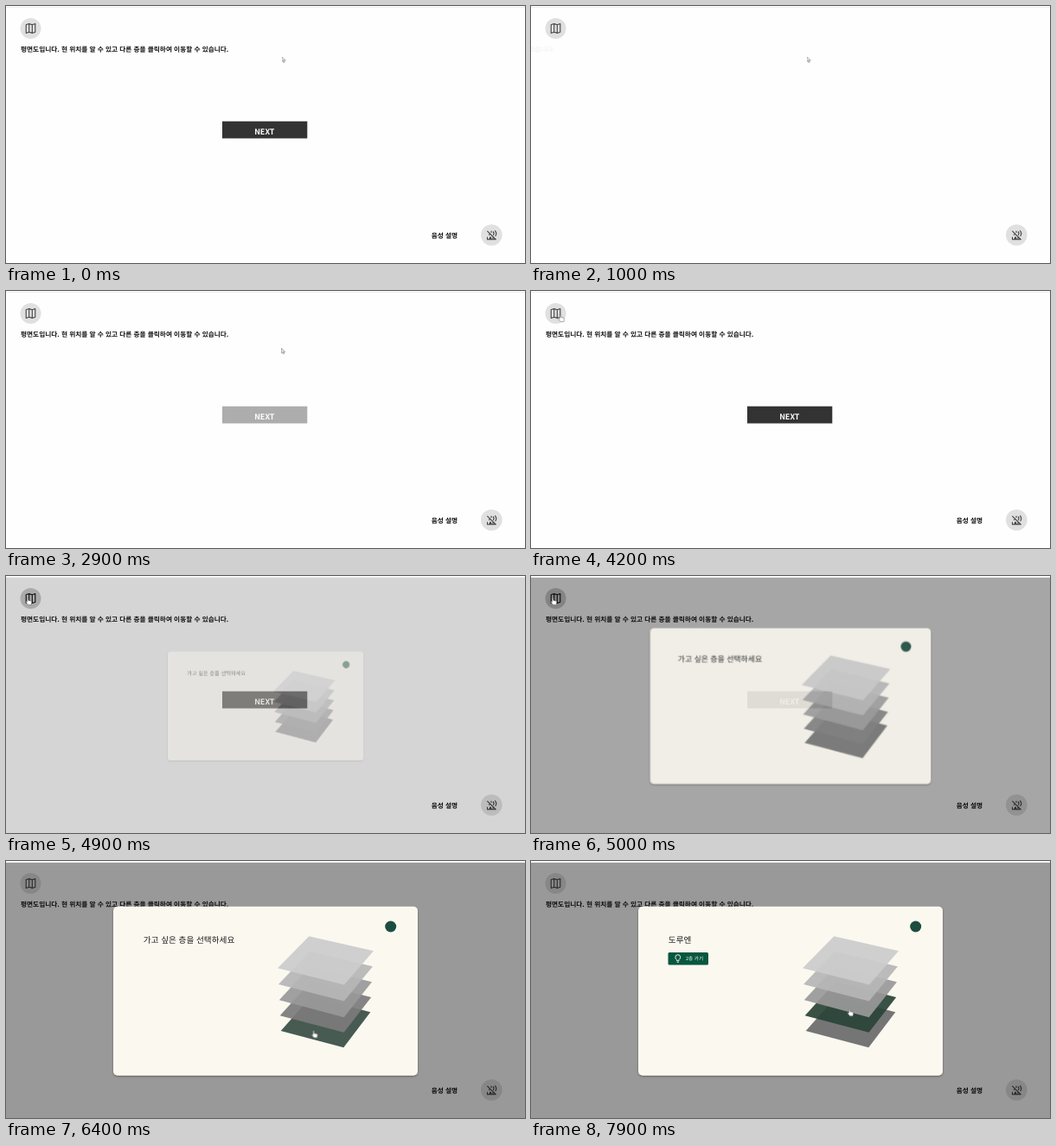
Recreate the animation shown at these times as an HTML page. Size 600 by 298 pixels, loop 8 s.

```html
<!DOCTYPE html>
<html lang="ko">
<head>
<meta charset="utf-8">
<title>Floor guide</title>
<style>
  html, body { margin: 0; width: 100%; height: 100%; overflow: hidden; background: #fefefe; }
  svg { display: block; width: 100vw; height: 100vh; }
  text {
    font-family: "Noto Sans CJK KR", "Noto Sans CJK", "Noto Sans", sans-serif;
    fill: #111; text-rendering: geometricPrecision;
  }
  .label { font-size: 7.68px; font-weight: 700; }
  .title { font-size: 9.65px; font-weight: 500; fill: #1c1c1c; }
  .line { fill: none; stroke: #444; stroke-width: 1.1; stroke-linejoin: round; }

  /* One shared 8 s clock: 1.25% = 100 ms */
  .intro, .voice, .next, .veil, .modal, .floor1, .floor2, .glyph, .disc,
  .pointer, .arrow, .hand, .ask, .answer { animation: 8s linear infinite; }

  .intro { animation-name: intro; }
  .voice { animation-name: voice; }
  .next { animation-name: next; }
  .veil { animation-name: veil; }
  .modal { animation-name: modal; transform-origin: 300px 151px; }
  .floor1 { animation-name: floor1; }
  .floor2 { animation-name: floor2; }
  .glyph { animation-name: glyph; }
  .disc { animation-name: disc; }
  .pointer { animation-name: pointer; }
  .arrow { animation-name: arrow; animation-timing-function: step-end; }
  .hand { animation-name: hand; animation-timing-function: step-end; }
  .ask { animation-name: ask; animation-timing-function: step-end; }
  .answer { animation-name: answer; animation-timing-function: step-end; }

  @keyframes intro {
    0% { opacity: 1; transform: none; }
    1.9% { opacity: 1; transform: none; animation-timing-function: ease; }
    11.6% { opacity: 0; transform: none; animation-timing-function: step-end; }
    11.75% { opacity: 0; transform: translateX(-240px); animation-timing-function: ease; }
    24.25%, 100% { opacity: 1; transform: none; }
  }
  @keyframes voice {
    0% { opacity: 1; }
    1.9% { opacity: 1; animation-timing-function: ease; }
    11.6% { opacity: 0; }
    24.25% { opacity: 0; animation-timing-function: ease; }
    36.75%, 100% { opacity: 1; }
  }
  @keyframes next {
    0% { opacity: 1; }
    1.9% { opacity: 1; animation-timing-function: ease; }
    11.6% { opacity: 0; }
    33.2% { opacity: 0; animation-timing-function: ease; }
    45.7%, 100% { opacity: 1; }
  }
  @keyframes veil {
    0% { opacity: 0; }
    60.7% { opacity: 0; animation-timing-function: cubic-bezier(.215, .61, .355, 1); }
    64.375%, 100% { opacity: .4; }
  }
  @keyframes modal {
    0% { opacity: 0; transform: scale(.4); }
    60.7% { opacity: 0; transform: scale(.4); animation-timing-function: cubic-bezier(.215, .61, .355, 1); }
    64.375%, 100% { opacity: 1; transform: none; }
  }
  @keyframes floor1 {
    0%, 78.5% { fill: #6b6b6b; }
    80%, 82% { fill: #384f45; }
    83.5%, 86.25% { fill: #2e483d; }
    88.75%, 100% { fill: #6b6b6b; }
  }
  @keyframes floor2 {
    0%, 86.25% { fill: #7b7b7b; }
    88.75%, 95.5% { fill: #3d544a; }
    98.75%, 100% { fill: #2a4438; }
  }
  @keyframes glyph {
    0%, 52.5% { stroke: #444; }
    53.75%, 73.75% { stroke: #111; }
    75%, 100% { stroke: #444; }
  }
  @keyframes disc {
    0%, 52.5% { fill: #e0e0e0; }
    53.75%, 73.75% { fill: #cacaca; }
    75%, 100% { fill: #e0e0e0; }
  }
  @keyframes pointer {
    0%, 13.75% { transform: translate(318.5px, 58.5px); }
    23%, 36.25% { transform: translate(318.3px, 66.2px); }
    46.25% { transform: translate(221.5px, 74px); animation-timing-function: ease-out; }
    53.75%, 73.1% { transform: translate(25px, 25px); animation-timing-function: ease-in-out; }
    79.5%, 84% { transform: translate(355.5px, 196.5px); animation-timing-function: ease-in-out; }
    88%, 96.25% { transform: translate(367px, 173px); }
    98.75%, 100% { transform: translate(368px, 171.3px); }
  }
  @keyframes arrow {
    0% { opacity: 1; }
    52.5% { opacity: 0; }
    74.4% { opacity: 1; }
    78.5%, 100% { opacity: 0; }
  }
  @keyframes hand {
    0% { opacity: 0; }
    52.5% { opacity: 1; }
    74.4% { opacity: 0; }
    78.5%, 100% { opacity: 1; }
  }
  @keyframes ask { 0% { opacity: 1; } 90%, 100% { opacity: 0; } }
  @keyframes answer { 0% { opacity: 0; } 90%, 100% { opacity: 1; } }
</style>
</head>
<body>
<svg viewBox="0 0 600 298" preserveAspectRatio="none">
  <defs>
    <filter id="shadow" x="-5%" y="-5%" width="110%" height="112%">
      <feDropShadow dx="0" dy="1" stdDeviation="1.3" flood-opacity=".4"/>
    </filter>
  </defs>
  <rect width="600" height="298" fill="#fefefe"/>
  <rect y="1" width="600" height="1" fill="#eee"/>

  <circle class="disc" cx="28.5" cy="26" r="12" fill="#e0e0e0"/>
  <path class="line glyph" d="M23.2 21.7 26.7 20.6 30.3 21.7 33.8 20.6V30.3L30.3 31.4 26.7 30.3 23.2 31.4ZM26.7 20.6V30.3M30.3 21.7V31.4"/>

  <circle cx="561.3" cy="265.5" r="12.3" fill="#e0e0e0"/>
  <path class="line" d="M556.3 260.8 566.5 271M558 265.5l2-1.5M561 263v-2.3M563 261.5q2 2 .3 4.3M565.2 260.3q3 3.2 .4 6.7M556.5 270.8v-3M558.6 270.8l1.4-3 1.4 3ZM563 267.5v3.3h1.8M556 270.8h9.5"/>

  <text class="label intro" x="17" y="52.6">평면도입니다. 현 위치를 알 수 있고 다른 층을 클릭하여 이동할 수 있습니다.</text>
  <text class="label voice" x="491.8" y="269.4">음성 설명</text>
  <g class="next">
    <rect x="250" y="133.7" width="98.3" height="19.8" fill="#333"/>
    <text x="298.8" y="148.8" text-anchor="middle" font-size="9" font-weight="700" style="fill:#fff">NEXT</text>
  </g>

  <rect class="veil" y="2" width="600" height="296"/>

  <g class="modal">
    <rect x="124" y="52.7" width="352" height="196" rx="5" fill="#fbf8f0" filter="url(#shadow)"/>
    <circle cx="444.7" cy="76" r="6.5" fill="#1d4d3f"/>
    <text class="title ask" x="158.8" y="94.9">가고 싶은 층을 선택하세요</text>
    <g class="answer">
      <text class="title" x="158.8" y="94.9">도루엔</text>
      <rect x="158.5" y="106" width="46.5" height="14.5" rx="1.5" fill="#07573f"/>
      <path d="M168.6 114.5q-1.7-1.2-1.7-2.9a2.9 2.9 0 0 1 5.8 0q0 1.7-1.7 2.9v1.2h-2.4ZM168.7 117.2h2.2" fill="none" stroke="#fff" stroke-width=".9"/>
      <text x="179" y="115.3" font-size="5.6" font-weight="500" style="fill:#fff">2층 가기</text>
    </g>
    <g fill-opacity=".92">
      <path class="floor1" d="M353 157 421.3 175.3 390.3 216.3 317.7 197Z"/>
      <path class="floor2" d="M352.3 140 422.2 158 390.6 198.7 316.7 179.3Z"/>
      <path fill="#999" d="M351.6 122.5 423 140.3 390.7 181.2 315.8 161.3Z"/>
      <path fill="#b7b7b7" d="M351 105 424 122.3 390.8 162.4 315 143Z"/>
      <path fill="#cdcdcd" d="M350.3 87.3 425 104.3 391 143.4 314 124.3Z"/>
    </g>
  </g>

  <g class="pointer" fill="#fff" stroke="#444" stroke-linejoin="round">
    <path class="arrow" stroke-width=".55" d="M.3 .3V5.8L1.6 4.7 2.5 6.6 3.5 6.2 2.7 4.4H4.3Z"/>
    <path class="hand" stroke-width=".5" d="M-.6 .5Q0-.5 .8 .4V3.2L4 4Q5 4.3 4.8 5.4L4.2 8.6H.6L-1.9 5.5Q-2.2 4.5-1.2 4.6L-.6 5.1Z"/>
  </g>
</svg>
</body>
</html>
```
